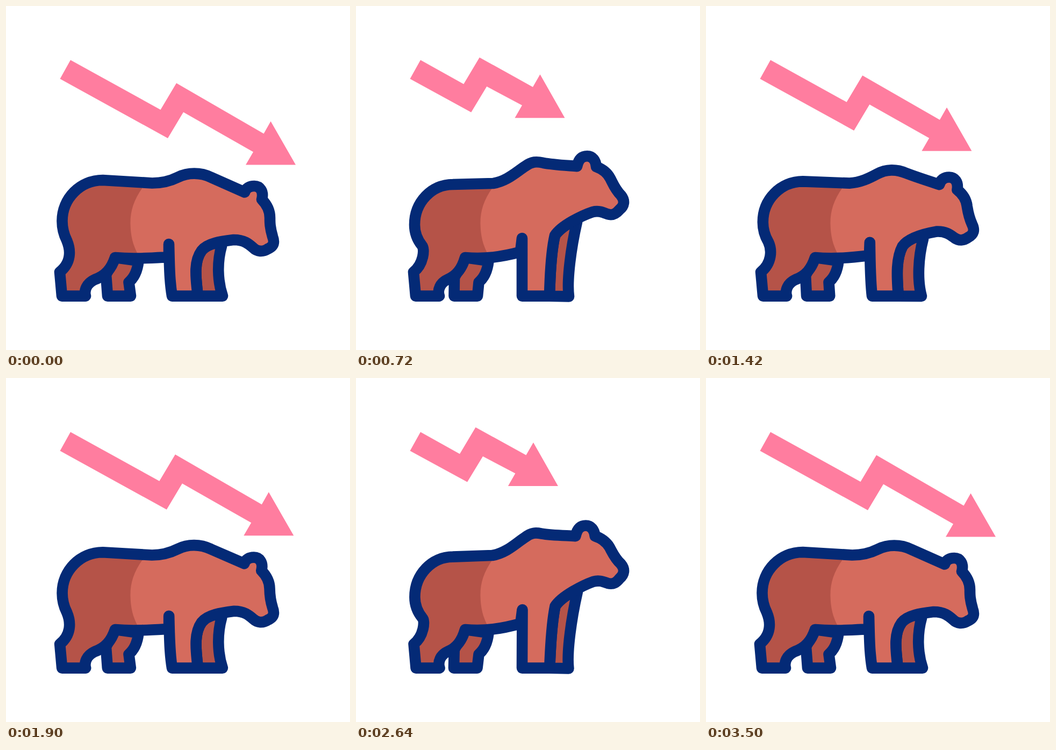
An HTML page that plays this animation: 640 by 640 pixels, repeating every 3600 ms.

```html
<!DOCTYPE html>
<html lang="en">
<head>
<meta charset="utf-8">
<title>Bear market</title>
<style>
  html, body { margin: 0; width: 100%; height: 100%; overflow: hidden; background: #fff; }
  svg { display: block; width: 100vw; height: 100vh; }
  .line { stroke: #042a76; stroke-width: 20.6; stroke-linecap: round; stroke-linejoin: round; }
</style>
</head>
<body>
<svg viewBox="0 0 640 640">
  <clipPath id="rump">
    <path d="M60 280H275L254 338C237 362 231 383 231.5 406C232 428 236 444 245 461L250 560H60Z"/>
  </clipPath>
  <path id="arrow" fill="#ff7d9f"/>
  <path id="hind" class="line" fill="#b55348"/>
  <path id="fore" class="line" fill="#b55348"/>
  <path id="skin" fill="#d56b5d"/>
  <path id="shade" fill="#b55348" clip-path="url(#rump)"/>
  <path id="outline" class="line" fill="none"/>
</svg>
<script>
const LOOP = 3600;
const REACH = 1.08; // how far the lifted pose is pushed past the drawn one

// Turning points of the motion: lowered, raised, lowered, raised, lowered
const TURNS = [100, 950, 1800, 2640, 3490];

// Each shape has a lowered and a raised pose with the same commands
const body = [
  `M104.5 400 C104.5 358 138 324 180 324 L272 329.5
   C290 329.5 305 326 320 318.5 C338 309.5 362 309 382 319
   C402 328 423 337 444 346.5
   C446 339 453 335 462 335 C472 335 480 344 476 360
   C485 369 491 380 491 394 C491 403 491 412 496 429
   C500 440 498 447 487 452 C478 458 467 457 460 450
   C452 443 443 435 424 435 C400 438 375 441 364 455
   C350 474 352 500 357 539.6 L309 539.6
   C304 510 304 480 303 443 L303 467
   C265 469 235 471 203 468 C196 489 185 502 165 509
   C150 516 145 529 148 539.6 L104 539.6 L100 495
   C121 478 121 455 113 436 C108 426 104.5 416 104.5 400 Z`,
  `M109 407 C109 365 141 332 180 332 L255 330
   C281 326 299 308 315 298 C327 289 336 289 348 291.7
   C365 295 385 296 411 298
   C414 285 420 279 430 279 C440 279 446 287 447 299
   C458 303 468 311 473 320.5 C478 330 482 341 493 352
   C501 362 499 372 490 379 C484 386 478 390 468 387
   C460 384 452 380 440 383 C422 389 382 408 370 427
   C363 457 361 500 360 539.6 L309 539.6
   C309 510 309 480 309 432 L306 457.5
   C270 467 240 471 203 468 C197 489 187 502 170 509
   C157 515 151 528 155 539.6 L111 539.6 L107 495
   C126 480 128 452 123 446 C114 435 109 422 109 407 Z`
];
const hindLeg = [
  'M186 500 L189 539.6 L232 539.6 L228.5 514 C239 505 245 490 246.5 474 L203 468 Z',
  'M183 505 L182.5 539.6 L226 539.6 L228.5 514 C239 505 245 490 246.5 474 L203 468 Z'
];
const foreLeg = [
  `M357 539.6 L403 539.6 C393 510 393 475 401 447 L389 441
   C378.5 443.7 369.5 448 364 455 C350 474 352 500 357 539.6 Z`,
  `M360 539.6 L396 540.5 C392 510 400 450 411 402 L402.8 400
   C389 408 376 417.5 370 427 C363 457 361 500 360 539.6 Z`
];
const arrowShape = [
  'M120 100.5 L287.5 193 L317 143.5 L479.5 237.5 L492.5 214.5 L539 295.5 L446 295.5 L460 271.5 L330 197.5 L301 246 L100.5 135.5 Z',
  'M120 100.5 L200 145 L229.5 95.5 L328.5 150.5 L342 127 L388 208 L295 208 L308.5 184.5 L243 149.5 L214 197.5 L100.5 135.5 Z'
];

const draw = (id, d) => document.getElementById(id).setAttribute('d', d);

function morph([low, high], k) {
  const ends = high.match(/[\d.]+/g);
  let i = 0;
  return low.replace(/[\d.]+/g, n => (+n + (ends[i++] - n) * k).toFixed(2));
}

// Cubic ease with control points (0.5, 0) and (0.35, 1)
function ease(x) {
  let lo = 0, hi = 1;
  for (let i = 0; i < 24; i++) {
    const s = (lo + hi) / 2, r = 1 - s;
    if (1.5 * s * r * r + 1.05 * s * s * r + s * s * s < x) lo = s; else hi = s;
  }
  return lo * lo * (3 - 2 * lo);
}

function lift(t) {
  for (let i = 0; i < TURNS.length - 1; i++) {
    const a = TURNS[i], b = TURNS[i + 1];
    if (t >= a && t < b) {
      const e = ease((t - a) / (b - a));
      return i % 2 ? 1 - e : e;
    }
  }
  return 0;
}

function render(t) {
  const k = lift(t) * REACH;
  const d = morph(body, k);
  draw('arrow', morph(arrowShape, k));
  draw('hind', morph(hindLeg, k));
  draw('fore', morph(foreLeg, k));
  draw('skin', d);
  draw('shade', d);
  draw('outline', d);
}

const start = performance.now();
function tick(now) {
  render(Math.max(0, now - start) % LOOP);
  requestAnimationFrame(tick);
}
render(0);
requestAnimationFrame(tick);
</script>
</body>
</html>
```
